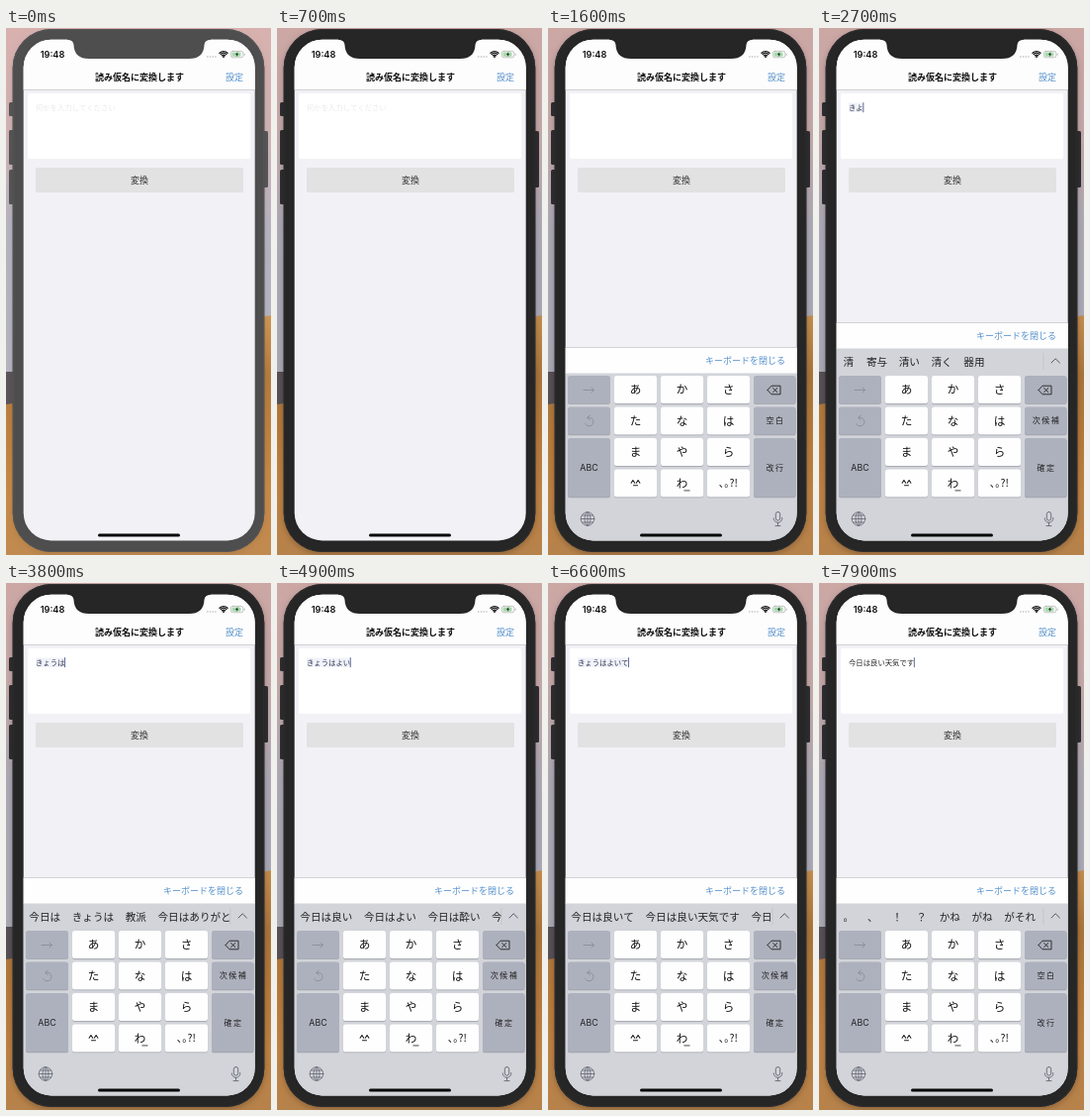
An HTML page with a canvas that plays this animation: 268x532 px, repeating every 8 s.

```html
<!DOCTYPE html>
<html lang="ja">
<head>
<meta charset="utf-8">
<style>
html, body { margin: 0; width: 100%; height: 100%; overflow: hidden; background: #8d7a78; }
canvas { display: block; width: 268px; height: 532px; }
</style>
</head>
<body>
<canvas id="stage"></canvas>
<script>
const W = 268, H = 532, LOOP = 8000;
const canvas = document.getElementById('stage');
const ctx = canvas.getContext('2d');
const dpr = window.devicePixelRatio || 1;
canvas.width = W * dpr;
canvas.height = H * dpr;

const JP = '"Noto Sans CJK JP", "Noto Sans CJK", sans-serif';
const LATIN = 'Inter, Roboto, sans-serif';
const BLUE = '#5590cb';
const FOCUS = 450, TAP = 837, RISE = 400;

// Each edit: time, text, candidates, committed
const edits = [
  [TAP, '', null, true],
  [2100, 'き', ['今日', '昨日', '気', '北', '聞いて', '切って']],
  [2500, 'きよ', ['清', '寄与', '清い', '清く', '器用']],
  [2800, 'きょ', ['今日', '去年', '距離', '許可', '巨大']],
  [3200, 'きょう', ['今日', '今日は', '今日の', '京', '教', '強']],
  [3600, 'きょうは', ['今日は', 'きょうは', '教派', '今日はありがとう']],
  [4300, 'きょうはよ', ['今日は良', '今日はよ', '今日は良く', '今日は夜']],
  [4700, 'きょうはよい', ['今日は良い', '今日はよい', '今日は酔い', '今日は宵']],
  [6200, 'きょうはよいて', ['今日は良いて', '今日は良い天気です', '今日はよいて']],
  [7200, '今日は良い天気です', ['。', '、', '！', '？', 'かね', 'がね', 'がそれ'], true]
];

const clamp = v => Math.max(0, Math.min(1, v));

function box(x, y, w, h, r, color) {
  ctx.fillStyle = color;
  ctx.beginPath();
  ctx.roundRect(x, y, w, h, r);
  ctx.fill();
}

function rect(x, y, w, h, color) {
  ctx.fillStyle = color;
  ctx.fillRect(x, y, w, h);
}

// y is the visual middle of the line
function label(s, x, y, size, color = '#1c1c1e', align = 'center', weight = 400, family = JP, gap = 0) {
  ctx.font = `${weight} ${size}px ${family}`;
  ctx.letterSpacing = gap + 'px';
  ctx.textAlign = align;
  ctx.fillStyle = color;
  ctx.fillText(s, x + (align === 'center' ? gap / 2 : 0), y + size * 0.37);
  ctx.letterSpacing = '0px';
}

function stroke(color, width, path) {
  ctx.strokeStyle = color;
  ctx.lineWidth = width;
  ctx.lineCap = ctx.lineJoin = 'round';
  ctx.beginPath();
  path();
  ctx.stroke();
}

function line(...p) {
  ctx.moveTo(p[0], p[1]);
  for (let i = 2; i < p.length; i += 2) ctx.lineTo(p[i], p[i + 1]);
}

function gradient(y0, y1, colors) {
  const g = ctx.createLinearGradient(0, y0, 0, y1);
  colors.forEach((c, i) => g.addColorStop(i / (colors.length - 1), c));
  return g;
}

function wallpaper(active) {
  rect(0, 0, W, H, gradient(0, 400, ['#d8b1ae', '#d0b2b2', '#b7b3c0', '#b4b4c1', '#b6b3bc']));
  // distant ridge on the left, then the dunes
  rect(0, 347, W / 2, 50, '#5b545a');
  ctx.fillStyle = gradient(290, H, ['#cf9654', '#b47c40', '#c0823f', '#c98a48', '#c08a50']);
  ctx.beginPath();
  ctx.moveTo(0, 380);
  ctx.bezierCurveTo(70, 372, 180, 305, W, 290);
  ctx.lineTo(W, H);
  ctx.lineTo(0, H);
  ctx.fill();
  rect(0, 0, W, H, `rgba(20,12,10,${0.06 * active})`);
}

function phone(active) {
  const v = Math.round(78 - 40 * active);
  const shell = `rgb(${v},${v},${v})`;
  const edge = `rgb(${v + 8},${v + 8},${v + 10})`;
  for (const [y, h] of [[75, 14], [103, 35], [143, 35]]) box(3, y, 6, h, 1.5, edge);
  box(259, 104, 6, 57, 1.5, edge);
  ctx.save();
  ctx.shadowColor = `rgba(0,0,0,${0.1 + 0.15 * active})`;
  ctx.shadowBlur = 6 * dpr;
  ctx.shadowOffsetY = 2 * dpr;
  box(6.7, 1, 254.6, 528, 39, shell);
  ctx.restore();
  stroke(edge, 1, () => ctx.roundRect(7.2, 1.5, 253.6, 527, 38.5));
  return shell;
}

function notch(color) {
  ctx.fillStyle = color;
  ctx.beginPath();
  ctx.moveTo(62, 11);
  ctx.lineTo(62, 11.7);
  ctx.quadraticCurveTo(68, 12, 68.5, 17);
  ctx.quadraticCurveTo(69, 31, 84, 31);
  ctx.lineTo(185, 31);
  ctx.quadraticCurveTo(200, 31, 200.5, 17);
  ctx.quadraticCurveTo(201, 12, 207, 11.7);
  ctx.lineTo(207, 11);
  ctx.fill();
}

function statusBar() {
  label('19:48', 47, 26.5, 9.2, '#111', 'center', 600, LATIN);
  for (let i = 0; i < 4; i++) box(203 + i * 2.7, 28.2, 1.6, 1.6, 0.8, '#b8b8b8');
  for (const r of [2.4, 4.2, 5.9])
    stroke('#111', 1.3, () => ctx.arc(220, 29.6, r, -Math.PI * 0.74, -Math.PI * 0.26));
  box(219, 28, 2, 2, 1, '#111');
  stroke('#b5b5b5', 0.8, () => ctx.roundRect(227.4, 23.4, 12.4, 6.4, 2));
  box(228.5, 24.5, 9, 4.2, 1, '#a3dba8');
  box(240.6, 25.4, 1, 2.4, 0.5, '#b5b5b5');
  ctx.fillStyle = '#333';
  ctx.beginPath();
  line(234.4, 24, 231.8, 27, 233.3, 27, 232.7, 29.3, 235.4, 26.2, 233.9, 26.2);
  ctx.fill();
}

function page(t, edit) {
  rect(17, 11, 236, 508, '#f2f1f6');
  rect(17, 11, 236, 51, '#fdfdfd');
  rect(17, 62, 236, 0.8, '#c9c8cd');
  statusBar();
  label('読み仮名に変換します', 135, 49.5, 9, '#111', 'center', 700);
  label('設定', 231, 49.5, 9, BLUE);

  box(22, 66, 225, 66, 2, '#fff');
  if (!edit) label('何かを入力してください', 30, 80, 7.35, '#e9e9eb', 'left');
  else textField(t, edit);

  box(30, 141, 210, 25, 1.5, '#e2e2e3');
  label('変換', 135, 153.5, 9, '#333');
}

function textField(t, [start, text, , done]) {
  const size = 7.35, w = text.length * size;
  if (!done) rect(30, 75.5, w, 9.5, '#f1f3fa');
  label(text, 30, 80.3, size, done ? '#222' : '#2f3550', 'left');
  if ((t - start) % 1100 < 720) rect(29.7 + w, 75.2, 0.9, 10, text ? '#4c5c8c' : '#333a4a');
}

function key(col, row, dark, rows = 1) {
  const x = 20 + col * 47, y = 351 + row * 31.5;
  const w = col === 4 ? 42.5 : 43, h = 28 + (rows - 1) * 31.5;
  box(x, y + 0.8, w, h, 2.6, '#9a9ea6');
  box(x, y, w, h, 2.6, dark ? '#adb1bd' : '#fefefe');
  return [x + w / 2, y + h / 2];
}

function symbols() {
  const dim = '#8a8e99', ink = '#222';
  stroke(dim, 0.9, () => {
    line(36, 365.5, 46.5, 365.5);
    line(44, 363, 46.5, 365.5, 44, 368);
  });
  stroke(dim, 0.9, () => {
    ctx.arc(41.5, 397.5, 4.4, -Math.PI * 0.62, Math.PI * 0.85);
    line(42.3, 390.8, 39.7, 393.4, 42.4, 395.6);
  });
  stroke(ink, 0.9, () => {
    line(222, 365.5, 226, 361.2, 235, 361.2, 235, 369.8, 226, 369.8, 222, 365.5);
    line(227.6, 363.5, 231.8, 367.6);
    line(231.8, 363.5, 227.6, 367.6);
  });
  const gray = '#646871';
  stroke(gray, 0.8, () => {
    ctx.arc(40, 495.5, 6.8, 0, Math.PI * 2);
    ctx.moveTo(43, 495.5);
    ctx.ellipse(40, 495.5, 3, 6.8, 0, 0, Math.PI * 2);
    line(33.2, 495.5, 46.8, 495.5);
    line(40, 488.7, 40, 502.3);
    line(34.5, 492, 45.5, 492);
    line(34.5, 499, 45.5, 499);
  });
  stroke(gray, 0.9, () => {
    ctx.roundRect(230.3, 488.5, 4.4, 8.6, 2.2);
    ctx.moveTo(236.7, 494.5);
    ctx.arc(232.5, 495, 4.3, 0, Math.PI);
    line(232.5, 499.4, 232.5, 502.4);
    line(230, 502.6, 235, 502.6);
  });
}

function candidates(list) {
  const size = 10.6;
  ctx.save();
  ctx.beginPath();
  ctx.rect(17, 323, 210, 26);
  ctx.clip();
  let x = 23.3;
  for (const word of list) {
    const w = Math.max(13, word.length * size);
    label(word, x + w / 2, 337, size, '#222');
    x += w + 11.6;
  }
  ctx.restore();
  rect(226.6, 328, 0.7, 17, '#bcbfc6');
  stroke('#555961', 1, () => line(235, 338, 239.2, 333.8, 243.4, 338));
}

function keyboard([, , list, done]) {
  const top = list ? 298 : 323;
  rect(17, top - 0.7, 236, 0.8, '#c5c5ca');
  rect(17, top, 236, 26, '#fefefe');
  label('キーボードを閉じる', 240, top + 12.5, 9, BLUE, 'right');
  rect(17, top + 25.5, 236, 530 - top, '#d2d4da');
  if (list) candidates(list);

  ['あかさ', 'たなは', 'まやら'].forEach((kana, row) =>
    [...kana].forEach((c, i) => {
      const [x, y] = key(i + 1, row);
      label(c, x, y, 11.6, '#111');
    }));
  let [x, y] = key(1, 3);
  stroke('#222', 1.1, () => {
    line(x - 4.4, y - 0.2, x - 2.6, y - 3, x - 0.8, y - 0.2);
    line(x + 0.8, y - 0.2, x + 2.6, y - 3, x + 4.4, y - 0.2);
    line(x - 2, y + 2.2, x + 2, y + 2.2);
  });
  [x, y] = key(2, 3);
  label('わ', x, y, 11.6, '#111');
  rect(x + 2, y + 7, 6, 0.9, '#333');
  [x, y] = key(3, 3);
  label('､｡?!', x, y, 10.5, '#111');

  key(0, 0, true);
  key(0, 1, true);
  label('ABC', ...key(0, 2, true, 2), 8.8, '#222', 'center', 400, LATIN);
  key(4, 0, true);
  label(done ? '空白' : '次候補', ...key(4, 1, true), 8, '#222', 'center', 400, JP, 1.6);
  label(done ? '改行' : '確定', ...key(4, 2, true, 2), 8, '#222', 'center', 400, JP, 1.6);
  symbols();
}

function draw(t) {
  ctx.setTransform(dpr, 0, 0, dpr, 0, 0);
  const active = clamp((t - FOCUS) / 150);
  const edit = edits.filter(e => e[0] <= t).pop();
  wallpaper(active);
  const shell = phone(active);

  ctx.save();
  ctx.beginPath();
  ctx.roundRect(17.7, 11.7, 234, 505.8, 28);
  ctx.clip();
  page(t, edit);
  if (edit) {
    const left = 1 - clamp((t - TAP) / RISE);
    ctx.save();
    ctx.translate(0, 197 * left ** 3);
    keyboard(edit);
    ctx.restore();
  }
  box(93, 510.5, 83, 3, 1.5, '#080808');
  ctx.restore();
  notch(shell);
}

function tick() {
  draw(performance.now() % LOOP);
  requestAnimationFrame(tick);
}
tick();
</script>
</body>
</html>
```
